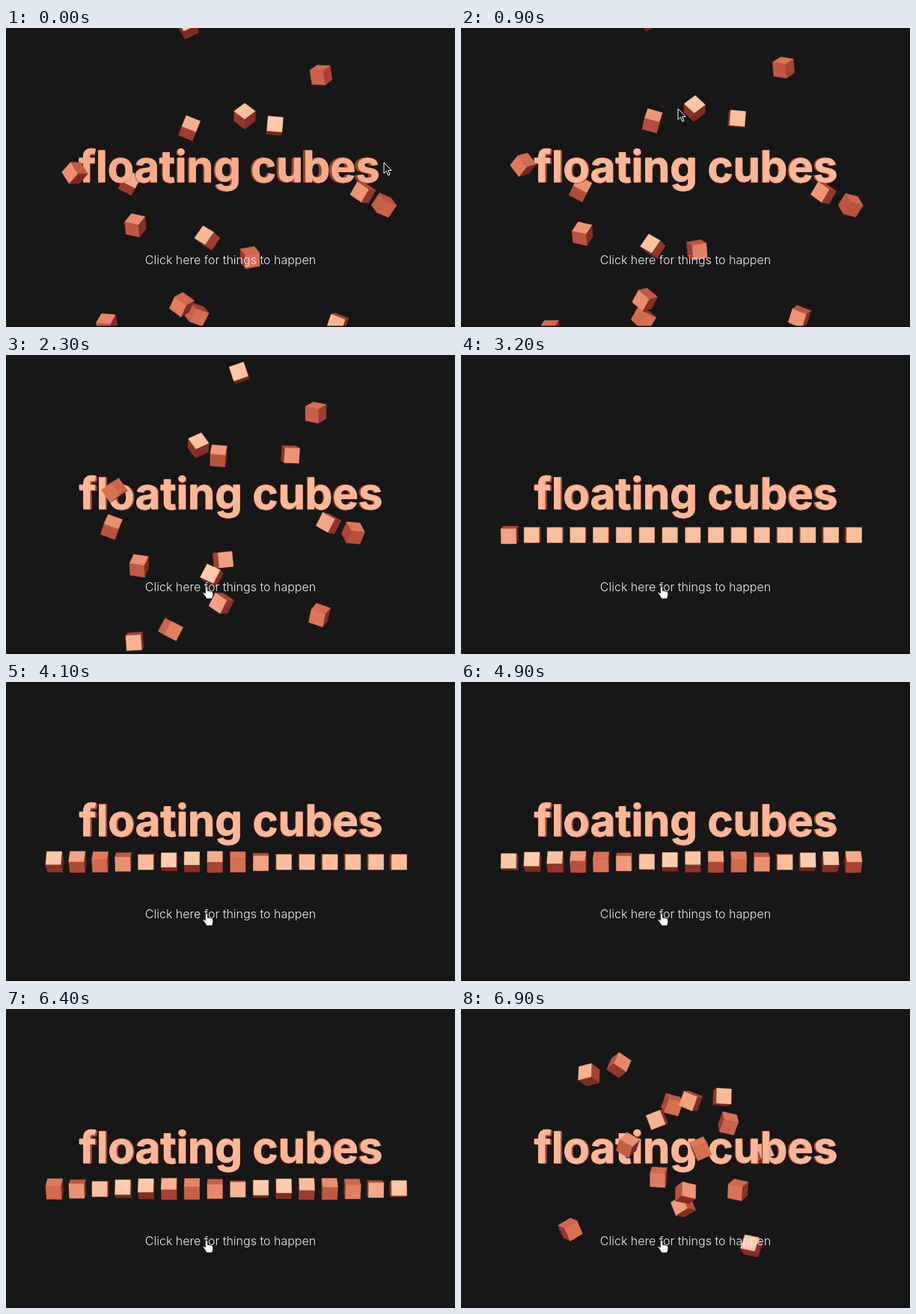
Write an HTML page that moves like this. It is 600 by 400 pixels and loops after 7 s.

```html
<!DOCTYPE html>
<html lang="en">
<head>
<meta charset="utf-8">
<title>floating cubes</title>
<style>
  html, body { margin: 0; width: 100%; height: 100%; overflow: hidden; background: #171717; }
  svg { display: block; width: 100vw; height: 100vh; }
  text { font-family: Inter, sans-serif; text-anchor: middle; }
  #title text { font-size: 58px; font-weight: 700; stroke-width: .8; stroke-linejoin: round; }
  #sub { font-size: 16px; font-weight: 300; fill: #ececec; }
</style>
</head>
<body>
<svg viewBox="0 0 600 400">
  <rect width="600" height="400" fill="#171717"/>
  <g id="back"></g>
  <g id="title"></g>
  <g id="front"></g>
  <rect y="398.5" width="600" height="1.5" fill="#110f0f"/>
  <text id="sub" x="300" y="316">Click here for things to happen</text>
  <path id="arrow" d="M0 0V14.5L3.3 11.4L5.8 17L8 16L5.6 10.6H10.3Z" fill="#111" stroke="#fff"/>
  <path id="hand" d="M-1.6 1.2Q0-1 1.6 1.2V6.5L3.2 6.2L4.6 7L6 6.8L7.2 7.8L8.6 8L8.8 12L7.5 17H0L-2.6 12.5L-5 9.6Q-4.6 7.8-2.8 9L-1.6 10Z" fill="#fff" stroke="#111" stroke-width=".8"/>
</svg>
<script>
const LOOP = 7000, STEP = 100;
const GATHER = 2200, SPIN = 3150, BURST = 6400;
const HALF = 10.1, DEPTH = 1700, CX = 300, CY = 200;

// start x, y | gathering x, y | burst x, y | roll, pitch, yaw
const cubes = [
  [319, 118, 257, 121, 223, 182, 0, 52, 45],
  [165, 207, 141, 230, 146, 295, 25, -35, 5],
  [505, 237, 464, 238, 171, 88, 32, 18, 28],
  [477, 220, 431, 225, 211, 75, 28, 14, -32],
  [255, 383, 220, 367, 262, 148, 27, 8, 28],
  [443, 395, 419, 348, 264, 225, 18, 5, -18],
  [326, 307, 290, 274, 282, 128, -2, 22, 18],
  [421, 63, 414, 77, 297, 264, -10, 22, -36],
  [173, 264, 178, 282, 300, 246, -3, 34, -25],
  [245, 134, 284, 135, 307, 123, 20, -38, 3],
  [359, 131, 380, 133, 320, 187, 5, -12, 0],
  [235, 370, 288, 332, 349, 118, 24, 26, -22],
  [269, 281, 275, 295, 388, 317, 35, -8, -36],
  [92, 194, 145, 181, 402, 193, -35, -22, -28],
  [135, 397, 172, 383, 370, 242, -8, 32, -20],
  [243, -2, 312, 24, 357, 153, -30, -25, 10]
];

const ramp = [
  [-.2, [112, 38, 28]], [.2, [134, 48, 36]], [.45, [172, 70, 53]],
  [.7, [216, 112, 84]], [.86, [240, 154, 122]], [.94, [252, 190, 155]], [1, [255, 206, 174]]
];
const light = [-.08, -.33, .94];

const $ = id => document.getElementById(id);
const clamp = x => Math.max(0, Math.min(1, x));
const mix = (a, b, k) => a + (b - a) * k;
const mixAll = (a, b, k) => a.map((v, i) => mix(v, b[i], k));
const smooth = x => (x = clamp(x), x * x * (3 - 2 * x));
const easeOut = x => 1 - (1 - clamp(x)) ** 2;
const rgb = c => `rgb(${c.map(Math.round)})`;
const dot = (a, b) => a[0] * b[0] + a[1] * b[1] + a[2] * b[2];
const slot = i => [65 + 30.6 * i, 240.7];
const wave = (i, k) => Math.sin(i * k + k);

function add(parent, tag, attrs = {}) {
  const el = document.createElementNS("http://www.w3.org/2000/svg", tag);
  for (const key in attrs) el.setAttribute(key, attrs[key]);
  return parent.appendChild(el);
}

function shade(normal) {
  const d = Math.max(ramp[0][0], Math.min(1, dot(normal, light)));
  let j = 1;
  while (j < ramp.length - 1 && ramp[j][0] < d) j++;
  const [d0, c0] = ramp[j - 1], [d1, c1] = ramp[j];
  return rgb(mixAll(c0, c1, (d - d0) / (d1 - d0)));
}

// Rotates by yaw, pitch, then clockwise roll; y points down, z to the viewer.
function rotate([x, y, z], angles) {
  const [r, p, w] = angles.map(a => a * Math.PI / 180);
  [x, z] = [x * Math.cos(w) + z * Math.sin(w), z * Math.cos(w) - x * Math.sin(w)];
  [y, z] = [y * Math.cos(p) + z * Math.sin(p), z * Math.cos(p) - y * Math.sin(p)];
  return [x * Math.cos(r) - y * Math.sin(r), x * Math.sin(r) + y * Math.cos(r), z];
}

function rowPitch(i, t) {
  const x = Math.max(0, (t - SPIN) / 1000 - .1 * i);
  return 144 * (x + .075 * clamp(x / .3));
}

function pose(i, t) {
  const [x0, y0, x1, y1, x2, y2, ...tilt] = cubes[i];
  const home = slot(i);
  if (t >= BURST) {
    const e = easeOut((t - BURST) / 1000), part = e / .75;
    const turn = rowPitch(i, BURST), near = turn - 90 * Math.round(turn / 90);
    const goal = [32 * wave(i, 2.1), 45 * wave(i, 1.3), 38 * wave(i, 3.7)];
    return { at: mixAll(home, [x2, y2], part), angles: mixAll([0, near, 0], goal, e) };
  }
  const pull = easeOut(.1);
  const edge = [x1, y1].map((v, k) => (v - pull * home[k]) / (1 - pull));
  const drift = Math.min(t, GATHER);
  const e = easeOut((t - GATHER) / 1000);
  const rates = [4 * wave(i, 1.7), 12 * wave(i, 2.4), 12 * wave(i, 3.1)];
  const angles = tilt.map((a, k) => (a + rates[k] * drift / 1000) * (1 - e));
  angles[1] += rowPitch(i, t);
  return { at: mixAll(mixAll([x0, y0], edge, drift / GATHER), home, e), angles };
}

const shapes = cubes.map(() => {
  const g = add($("front"), "g", { "stroke-width": .4, "stroke-linejoin": "round" });
  const faces = [];
  for (let k = 0; k < 6; k++) faces.push(add(g, "polygon"));
  return { g, faces };
});

function drawCube(i, t) {
  const { at, angles } = pose(i, t);
  const axes = [[1, 0, 0], [0, 1, 0], [0, 0, 1]].map(v => rotate(v, angles));
  const mid = [at[0] - CX, at[1] - CY, 0];
  const { g, faces } = shapes[i];
  const layer = $(i === 1 || (i === 13 && t >= BURST) ? "back" : "front");
  if (g.parentNode !== layer) layer.appendChild(g);

  faces.forEach((face, k) => {
    const a = k >> 1, sign = k % 2 ? 1 : -1;
    const n = axes[a].map(v => v * sign), u = axes[(a + 1) % 3], v = axes[(a + 2) % 3];
    const toEye = mid.map((m, j) => (j === 2 ? DEPTH : 0) - m - n[j] * HALF);
    const seen = dot(n, toEye) > 0;
    face.setAttribute("display", seen ? "inline" : "none");
    if (!seen) return;
    const points = [[-1, -1], [1, -1], [1, 1], [-1, 1]].map(([p, q]) => {
      const [x, y, z] = mid.map((m, j) => m + HALF * (n[j] + p * u[j] + q * v[j]));
      const s = DEPTH / (DEPTH - z);
      return (CX + x * s).toFixed(2) + "," + (CY + y * s).toFixed(2);
    });
    const fill = shade(n);
    face.setAttribute("points", points.join(" "));
    face.setAttribute("fill", fill);
    face.setAttribute("stroke", fill);
  });
}

const LAYERS = 6;
const letters = [];
for (let k = 0; k <= LAYERS; k++) {
  const el = add($("title"), "text", { x: 300.5, y: 206 });
  el.textContent = "floating cubes";
  letters.push(el);
}

function drawTitle(t) {
  const turn = 1 - smooth(t / 800);
  letters.forEach((el, k) => {
    const deep = 1 - k / LAYERS, s = 1 - .012 * deep;
    const dx = -2 * turn - 2 * turn * deep;
    const fill = k < LAYERS ? "#8f4735" : rgb(mixAll([253, 183, 151], [249, 172, 138], turn));
    el.setAttribute("transform",
      `translate(${CX + dx} ${CY}) scale(${s * (1 - .008 * turn)} ${s}) translate(${-CX} ${-CY})`);
    el.setAttribute("fill", fill);
    el.setAttribute("stroke", fill);
  });
}

function drawCursor(t) {
  const first = mixAll([505, 180], [290, 108], smooth(t / 900));
  const [x, y] = mixAll(first, [268, 309], smooth((t - 900) / 1000));
  const over = y > 300;
  $("arrow").setAttribute("display", over ? "none" : "inline");
  $("hand").setAttribute("display", over ? "inline" : "none");
  $(over ? "hand" : "arrow").setAttribute("transform", `translate(${x} ${y})`);
}

function draw(t) {
  cubes.forEach((_, i) => drawCube(i, t));
  drawTitle(t);
  drawCursor(t);
}

let begin = null, last = -1;
function tick(now) {
  if (begin === null) begin = now;
  const t = Math.floor((now - begin) % LOOP / STEP) * STEP;
  if (t !== last) draw(last = t);
  requestAnimationFrame(tick);
}
draw(0);
requestAnimationFrame(tick);
</script>
</body>
</html>
```
